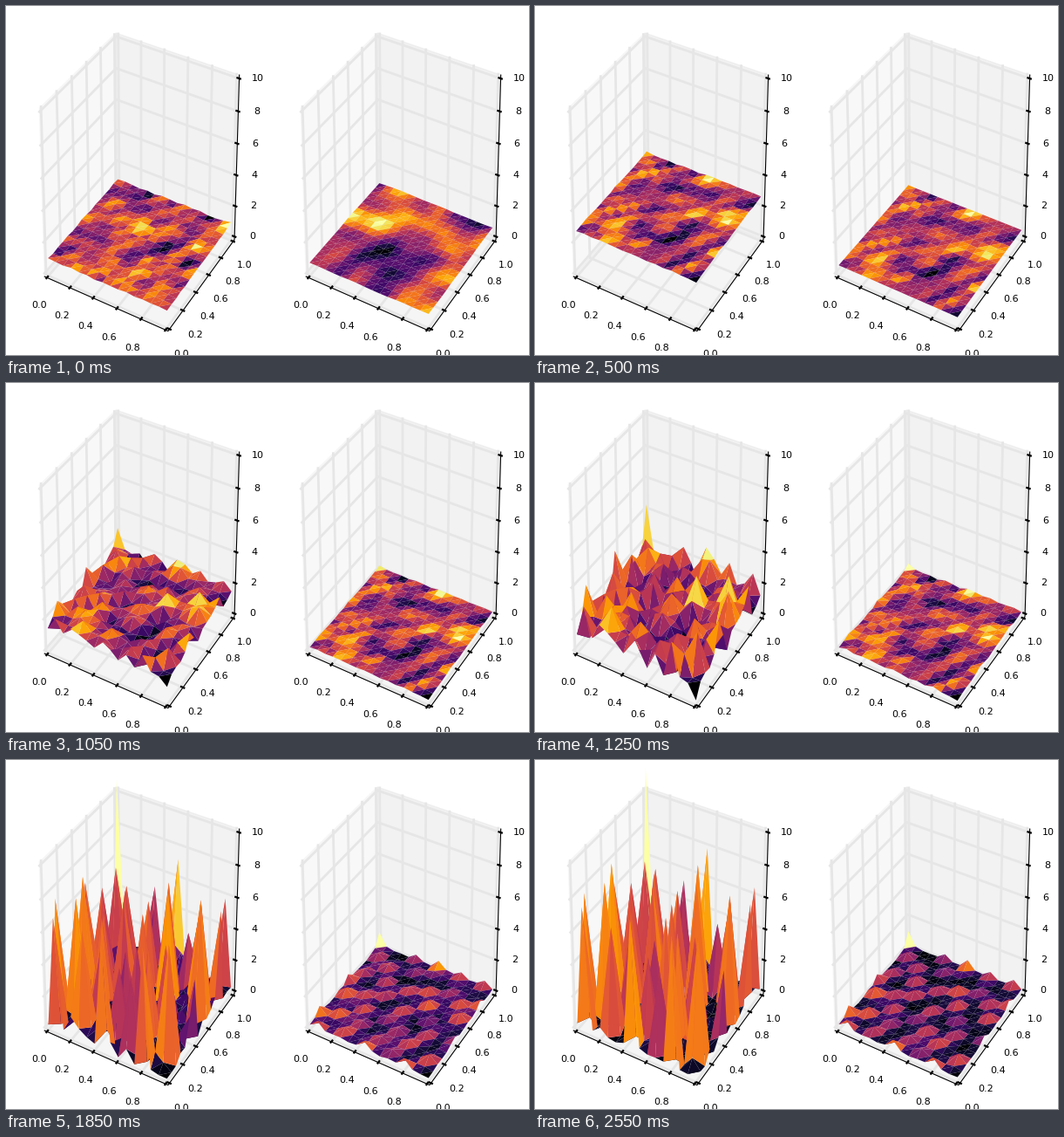
Animation of 600x400 px, one loop 2600 ms. Source, as a matplotlib script:

```python
import numpy as np
import matplotlib.pyplot as plt
from matplotlib.animation import FuncAnimation
from matplotlib.collections import PolyCollection

W, H = 600, 400
FRAMES, STEP = 52, 50
N = 15                      # cells per side of the mesh
EDGE = 0.5 + 1 / 48         # half width of the box around the unit cube
INFERNO = plt.get_cmap("inferno")

plt.rcParams["font.family"] = "DejaVu Sans"
fig = plt.figure(figsize=(W / 100, H / 100), dpi=100, facecolor="white")
ax = fig.add_axes([0, 0, 1, 1])
ax.set_xlim(0, W)
ax.set_ylim(H, 0)
ax.axis("off")


def project(x, y, z, left=0):
    """Perspective view of centred cube coordinates, in pixels plus depth."""
    c, s = np.cos(np.pi / 6), 0.5
    right = c * x + s * y
    up = -0.25 * x + c * s * y + c * z
    near = c * s * x - 0.75 * y + 0.5 * z
    dist = 10 - near
    return left + 154.9 + 1570 * right / dist, 195.7 - 2114 * up / dist, dist


def path(points, left, **style):
    px, py, _ = project(*np.array(points, float).T, left)
    ax.plot(px, py, **style)


def pane(points, shade, left):
    px, py, _ = project(*np.array(points, float).T, left)
    ax.fill(px, py, facecolor=str(shade), edgecolor=str(shade),
            alpha=0.5, lw=1, zorder=0)


def label(text, point, left, dy):
    px, py, _ = project(*point, left)
    ax.text(px, py + dy, text, fontsize=8, ha="center", va="center", zorder=2)


def draw_box(left):
    e = EDGE
    pane([(-e, -e, -e), (-e, e, -e), (-e, e, e), (-e, -e, e)], 0.95, left)
    pane([(-e, e, -e), (e, e, -e), (e, e, e), (-e, e, e)], 0.9, left)
    pane([(-e, -e, -e), (e, -e, -e), (e, e, -e), (-e, e, -e)], 0.925, left)

    grid = dict(color="0.9", lw=2, zorder=1)
    tick = dict(color="black", lw=1.6, zorder=2, solid_capstyle="butt")
    line = dict(color="black", lw=0.8, zorder=2)
    out, back, pad = e + 0.016, e - 0.022, e + 0.114
    for k in range(6):
        p = k / 5 - 0.5
        path([(p, -e, -e), (p, e, -e), (p, e, e)], left, **grid)
        path([(e, p, -e), (-e, p, -e), (-e, p, e)], left, **grid)
        path([(-e, -e, p), (-e, e, p), (e, e, p)], left, **grid)
        path([(p, -out, -e), (p, -back, -e)], left, **tick)
        path([(out, p, -e), (back, p, -e)], left, **tick)
        path([(out, e, p), (back, e, p)], left, **tick)
        label(f"{k / 5:.1f}", (p, -pad, -pad), left, 0.6)
        label(f"{k / 5:.1f}", (pad - 0.015, p, -pad), left, 2)
        label(str(2 * k), (e + 0.1, e + 0.1, p), left, 3.8)
    path([(-e, -e, -e), (e, -e, -e), (e, e, -e), (e, e, e)], left, **line)


def blur(a):
    p = np.pad(a, 1, mode="edge")
    return (2 * a + p[2:, 1:-1] + p[:-2, 1:-1] + p[1:-1, 2:] + p[1:-1, :-2]) / 6


def spike_field(rng):
    """Spikes kept apart from each other, the tallest in the back corner."""
    field = rng.exponential(0.25, (N + 1, N + 1))
    field[0, N] = 11.5
    taken = [(0, N)]
    for k in rng.permutation((N + 1) ** 2):
        i, j = divmod(int(k), N + 1)
        if (i, j) != (N, 0) and all(np.hypot(i - a, j - b) > 2 for a, b in taken):
            taken.append((i, j))
            field[i, j] = rng.uniform(4.5, 8.5)
    return field


def ripple_field(rng):
    """Noise in bands along the mesh diagonal, low in the front corner."""
    n = rng.normal(size=(N + 2, N + 2))
    field = 0.7 * (n[:-1, :-1] + 0.8 * n[1:, 1:])
    field[N, 0] = -2.5
    return field


rng = np.random.default_rng(12)
spikes = spike_field(rng)
bumps = 0.05 + 0.065 * (0.7 * spikes + 0.9 * blur(spikes))
ripple = ripple_field(rng)
rough = rng.normal(size=spikes.shape)
cloud = 2 * blur(blur(rng.normal(size=spikes.shape)))

side = np.linspace(-0.5, 0.5, N + 1)
gx, gy = np.meshgrid(side, side, indexing="ij")
ids = np.arange((N + 1) ** 2).reshape(N + 1, N + 1)
a, b, c, d = (q.ravel() for q in
              (ids[:-1, :-1], ids[1:, :-1], ids[1:, 1:], ids[:-1, 1:]))
tris = np.concatenate([np.stack([a, b, c], 1), np.stack([a, c, d], 1)])


def sigmoid(x):
    return 1 / (1 + np.exp(-x))


def heights(t):
    """Flat sheets that rise, sink and then break up into spikes."""
    grow = sigmoid((t - 1520) / 180)
    start = max(0, 1 - t / 200)
    wave = np.exp(-((t - 1500) / 430) ** 2)
    x = t / 300
    pulse = (x * np.exp(1 - x)) ** 3.3

    level = 1.65 - 0.75 * np.exp(-t / 100) + 1.75 * pulse
    u = (1 - grow) * level + grow * spikes
    u += (1 - start) * (0.02 + 0.75 * wave) * ripple + 0.03 * start * rough

    level = 0.17 + 0.7 * sigmoid((480 - t) / 90) - 0.22 * np.exp(-t / 80)
    v = (1 - grow) * level + grow * bumps
    v += (1 - start) * (0.004 + 0.05 * wave) * ripple + 0.02 * start * cloud
    return np.maximum(u, 0), np.maximum(v, 0)


def update_surface(coll, z, left):
    px, py, dist = project(gx.ravel(), gy.ravel(), z.ravel() / 10 - 0.5, left)
    order = np.argsort(-dist[tris].mean(1))
    tone = z.ravel()[tris].mean(1)
    tone = (tone - tone.min()) / (tone.max() - tone.min())
    coll.set_verts(np.stack([px, py], 1)[tris[order]])
    coll.set_facecolor(INFERNO(tone[order]))


surfaces = []
for left in (0, 300):
    draw_box(left)
    surface = PolyCollection([], linewidths=0, edgecolors="none", zorder=3)
    ax.add_collection(surface, autolim=False)
    surfaces.append(surface)


def draw(frame):
    for coll, z, left in zip(surfaces, heights(frame * STEP), (0, 300)):
        update_surface(coll, z, left)
    return surfaces


anim = FuncAnimation(fig, draw, frames=FRAMES, interval=STEP, repeat=True,
                     repeat_delay=0, blit=False)
plt.show()
```
